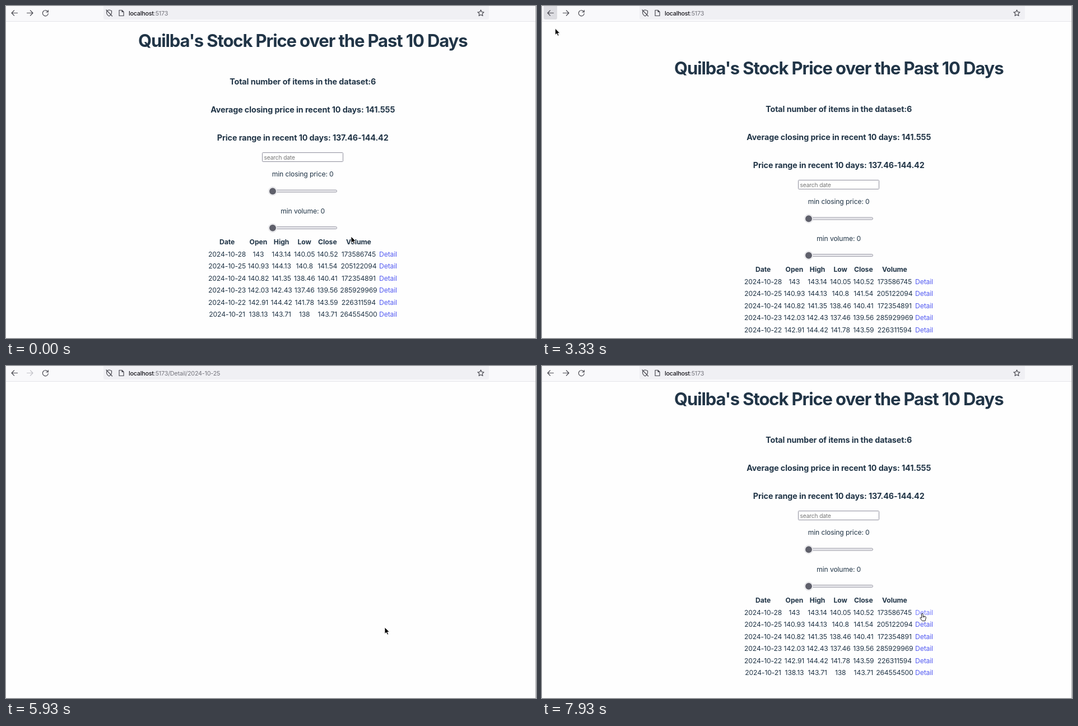
An HTML page that plays this animation: 946 by 592 pixels, repeating every 8 s.

```html
<!DOCTYPE html>
<html lang="en">
<head>
<meta charset="utf-8">
<title>Stock prices</title>
<style>
html, body { margin: 0; height: 100%; overflow: hidden; background: #fefefe; }
svg { display: block; }
text { font: 12.2px Inter, "Open Sans", sans-serif; fill: #213547; text-anchor: middle; letter-spacing: -.012em; white-space: pre; }
.h1 { font-size: 31px; font-weight: 700; letter-spacing: -.036em; }
.h3 { font-size: 14.3px; font-weight: 700; letter-spacing: -.006em; }
.th { font-weight: 700; letter-spacing: -.003em; }
.link { fill: #535bf2; }
.link.over { fill: #747bff; }
.hint { font-size: 10.2px; fill: #757575; text-anchor: start; }
.url { font-size: 10.8px; fill: #75757d; text-anchor: start; letter-spacing: -.022em; }
.host { fill: #15141a; font-weight: 500; }
.icon { fill: none; stroke: #4a4a52; stroke-width: 1.2; stroke-linecap: round; stroke-linejoin: round; }
</style>
</head>
<body>
<svg width="946" height="592" viewBox="0 0 946 592">
  <g id="home"></g>
  <g id="detail"></g>
  <rect width="946" height="27" fill="#f9f9fb"/>
  <rect y="27" width="946" height="1" fill="#e4e4e9"/>
  <rect x="174" y="-6" width="688" height="30" rx="3" fill="#f0f0f4"/>
  <rect id="press" x="3" y="-2" width="24" height="26" rx="3" fill="#dcdce1"/>
  <g class="icon">
    <path d="M20.500 12.500H10M14.500 8L10 12.500L14.500 17"/>
    <path id="forward" d="M37.500 12.500H48M43.500 8L48 12.500L43.500 17"/>
    <path d="M74.800 10.500A5 5 0 1 0 75.300 13.500M75.300 7.500V11H71.800"/>
    <path d="M180 8.500L184 7L188.500 8.500V12Q188 16 184 18Q180 16 179.500 12ZM179 7L189.500 18"/>
    <path d="M202 7.500H207L210 10.500V17.500H202ZM207 7.500V10.500H210"/>
    <path id="star"/>
  </g>
  <text class="url" x="219" y="16.600"><tspan class="host">localhost</tspan>:5173<tspan id="path"></tspan></text>
  <rect x="945" width="1" height="592" fill="#a5a5a9"/>
  <g id="cursor" stroke-linejoin="round">
    <path id="arrow" d="M0 0V11.500L2.700 9L4.700 13.200L6.600 12.300L4.700 8.300H8.300Z" fill="#000" stroke="#fff" stroke-width=".8"/>
    <path id="hand" d="M-1.500 1Q0 -1 1 1V5L5 5.500Q6.500 6 6.300 8L5 13.500H-.5L-4 8.500Q-4 6.500 -2.500 7.500L-1.500 8.500ZM1 5V7.500M3 5.500V7.500" fill="#fff" stroke="#222"/>
  </g>
</svg>
<script>
const $ = id => document.getElementById(id);
const MID = 529.7;

function add(parent, tag, attrs, label = '') {
  const el = document.createElementNS('http://www.w3.org/2000/svg', tag);
  for (const k in attrs) el.setAttribute(k, attrs[k]);
  el.textContent = label;
  return parent.appendChild(el);
}
// y is the middle of the capitals
const write = (parent, label, x, y, cls = '', size = 12.2) =>
  add(parent, 'text', { x, y: y + size * .36, class: cls }, label);
const show = (el, on) => el.style.display = on ? '' : 'none';

const star = Array.from({ length: 10 }, (_, i) => {
  const r = i % 2 ? 2.8 : 5.8, a = i * Math.PI / 5;
  return `${847.5 + r * Math.sin(a)} ${12.8 - r * Math.cos(a)}`;
});
$('star').setAttribute('d', `M${star.join('L')}Z`);

const rows = `2024-10-28 143 143.14 140.05 140.52 173586745
2024-10-25 140.93 144.13 140.8 141.54 205122094
2024-10-24 140.82 141.35 138.46 140.41 172354891
2024-10-23 142.03 142.43 137.46 139.56 285929969
2024-10-22 142.91 144.42 141.78 143.59 226311594
2024-10-21 138.13 143.71 138 143.71 264554500`.split('\n').map(r => r.split(' '));
const heads = 'Date Open High Low Close Volume';
const columnX = i => i === 0 ? 394.6 : i < 5 ? 409.4 + i * 41.1 : 629.4;

// Home page, laid out around the heading at y = 0
const home = $('home'), detail = $('detail');
write(home, "Quilba's Stock Price over the Past 10 Days", MID, 0, 'h1', 31);
add(home, 'rect', { x: 457.5, y: 199.5, width: 144, height: 16, rx: 1, fill: '#fff', stroke: '#8f8f9d' });
write(home, 'search date', 460.5, 208, 'hint', 10.2);
['min closing price: 0', 'min volume: 0'].forEach((label, i) => {
  const y = 238 + i * 65.6;
  write(home, label, MID, y);
  add(home, 'rect', { x: 470.5, y: y + 28, width: 120, height: 4, rx: 2, fill: '#e9e9ed', stroke: '#9a9aa6' });
  add(home, 'circle', { cx: 476, cy: y + 30.2, r: 7.5, fill: '#fff', stroke: '#d8d8de' });
  add(home, 'circle', { cx: 476, cy: y + 30.2, r: 6, fill: '#5f606b' });
});
const empty = add(home, 'g', {}), full = add(home, 'g', {});
[['Total number of items in the dataset:', '', '6'],
 ['Average closing price in recent 10 days:', '', ' 141.555'],
 ['Price range in recent 10 days:', ' -', ' 137.46-144.42']].forEach(([title, none, value], i) => {
  const y = 73 + i * 50.1;
  write(empty, title + none, MID, y, 'h3', 14.3);
  write(full, title + value, MID, y, 'h3', 14.3);
});
write(empty, heads, MID, 359, 'th');
heads.split(' ').forEach((s, i) => write(full, s, columnX(i), 359, 'th'));
const links = rows.map((row, r) => {
  const y = 380.6 + r * 21.4;
  row.forEach((s, i) => write(full, s, columnX(i), y));
  return write(full, 'Detail', 682, y, 'link');
});

// Detail page
const labels = ['date', 'raw opening price', 'raw closing price', 'raw high price', 'raw low price', 'volume',
  'adjusted opening price', 'adjusted high price', 'adjusted low price', 'adjusted closing price', 'adjusted volume'];
const lines = labels.map((_, i) => write(detail, '', MID, 159.3 + i * 30.55));
function openDetail([date, open, high, low, close, vol], adjusted) {
  const values = [date, open, close, high, low, vol, open, high, low, close, adjusted];
  lines.forEach((el, i) => el.textContent = `${labels[i]}: ${values[i]}`);
}

// Pointer strokes: start, end, x, y; each one slows down towards its goal
const strokes = [
  [70, 650, 684, 545], [650, 1070, 675, 451], [2070, 2930, 11, 13], [3270, 3330, 19, 39], [3330, 3530, 326, 114],
  [3610, 4470, 673, 525], [4730, 5470, 676, 466], [6070, 6200, 294, 308], [6340, 7130, 9, 14],
  [7270, 7530, 330, 150], [7610, 7930, 679, 441]];
function pointer(t) {
  let x = 616, y = 411;
  for (const [start, end, toX, toY] of strokes) {
    const p = Math.min(1, Math.max(0, (t - start) / (end - start)));
    const e = 1 - (1 - p) ** 3;
    x += (toX - x) * e;
    y += (toY - y) * e;
  }
  return [x, y];
}

// Scrolls 50 px to the end of the page; swing makes it bounce there
const scroll = (s, decay, swing) => s < 0 ? 111 : Math.round(61 + 50 * Math.exp(-s / decay) * Math.cos(s * swing));
const headingY = t =>
  t < 3330 ? 62 :
  t < 7270 ? scroll(t - 4640, 20, 0) :
  t < 7330 ? 126 : scroll(t - 7625, 110, 1 / 75);

const within = (t, ...spans) => spans.some(([a, b]) => t >= a && t < b);
let current = -1;
function draw(t) {
  const row = within(t, [1470, 3330]) ? 0 : within(t, [5870, 7270]) ? 1 : -1;
  const away = row >= 0;
  if (row !== current) {
    current = row;
    if (away) openDetail(rows[row], row ? '205122094' : '171208620');
    $('path').textContent = away ? '/Detail/' + rows[row][0] : '';
    $('forward').style.stroke = away ? '#c3c3c8' : '';
  }
  const blank = within(t, [7270, 7330]);
  show(home, !away);
  show(detail, within(t, [1870, 3330], [6130, 7270]));
  show(empty, blank);
  show(full, !blank);
  home.setAttribute('transform', `translate(0 ${headingY(t)})`);
  show($('press'), within(t, [2800, 3395], [6960, 7330]));

  $('cursor').setAttribute('transform', `translate(${pointer(t)})`);
  const hand = within(t, [1000, 1470], [5300, 5870], [7900, 8000]);
  show($('hand'), hand);
  show($('arrow'), !hand);
  const over = hand ? +within(t, [5300, 5870]) : -1;
  links.forEach((el, i) => el.classList.toggle('over', i === over));
}
function loop(now) {
  draw(now % 8000);
  requestAnimationFrame(loop);
}
requestAnimationFrame(loop);
</script>
</body>
</html>
```
